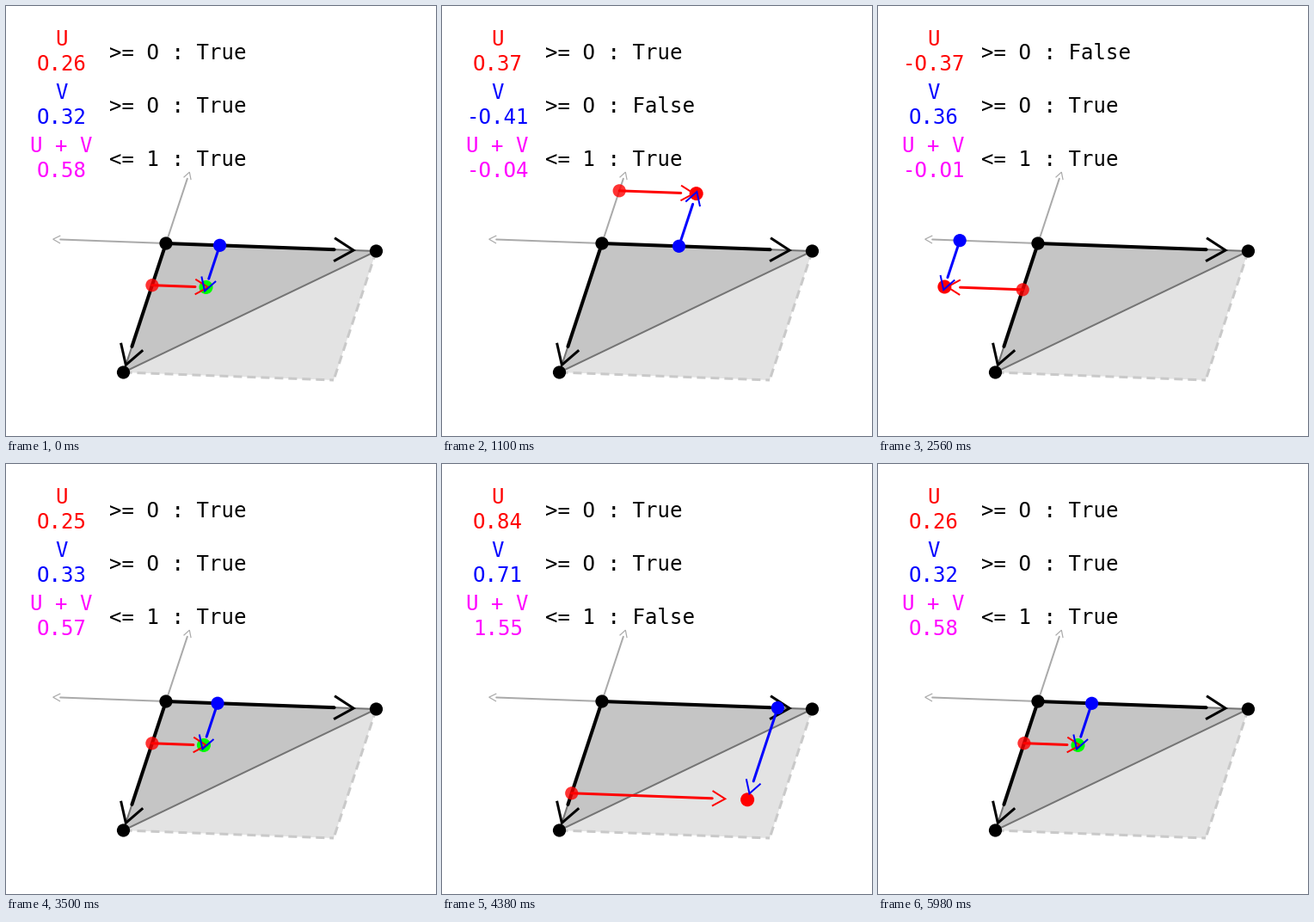
A matplotlib script for the animation above (6 s loop, 500 by 500 pixels).

```python
import numpy as np
import matplotlib.pyplot as plt
from matplotlib.animation import FuncAnimation
from matplotlib.patches import Circle, Polygon

SIZE, DPI, FRAMES, STEP = 500, 100, 300, 20
PX = 72 / DPI
LEG = 995  # ms for one way out or back

A = np.array([186.0, 276.0])
B = np.array([430.5, 285.0])
C = np.array([136.5, 426.0])
E1, E2 = B - A, C - A
D = A + E1 + E2

HOME = np.array([0.256, 0.3245])
PEAKS = np.array([[0.408, -0.687], [-0.3795, 0.3595], [0.860, 0.728]])

# Sharp start, then a long settling tail
KNOT_T = np.array([0, 40, 85, 105, 150, 200, 245, 300, 360, 400, 510, 600, 800, 1000])
KNOT_Q = np.array([0, .045, .193, .276, .54, .79, .88, .923, .948,
                   .96, .983, .989, .997, 1])
SLOPE = np.gradient(KNOT_Q, KNOT_T)
SLOPE[[0, -1]] = 0


def ease(ms):
    """Cubic Hermite through the knots."""
    if ms >= KNOT_T[-1]:
        return 1.0
    i = np.searchsorted(KNOT_T, ms, side="right") - 1
    h = KNOT_T[i + 1] - KNOT_T[i]
    s = (ms - KNOT_T[i]) / h
    return (KNOT_Q[i] * (1 + 2 * s) * (1 - s) ** 2
            + KNOT_Q[i + 1] * s * s * (3 - 2 * s)
            + h * SLOPE[i] * s * (1 - s) ** 2
            + h * SLOPE[i + 1] * s * s * (s - 1))


def uv_at(ms):
    leg = min(int(ms // LEG), 5)
    q = ease(ms - leg * LEG)
    if leg % 2:
        q = 1 - q
    return HOME + (PEAKS[leg // 2] - HOME) * q


fig = plt.figure(figsize=(SIZE / DPI, SIZE / DPI), dpi=DPI, facecolor="white")
ax = fig.add_axes([0, 0, 1, 1])
ax.set_xlim(0, SIZE)
ax.set_ylim(SIZE, 0)
ax.axis("off")


def line(pts, color, width, z, **kw):
    x, y = np.transpose(pts)
    kw.setdefault("solid_capstyle", "round")
    return ax.plot(x, y, color=color, lw=width * PX, zorder=z, **kw)[0]


def dot(center, color, z, radius=7.6, alpha=1):
    return ax.add_patch(Circle(center, radius, fc=color, ec="none", alpha=alpha, zorder=z))


class Arrow:
    """Shaft over 80% of the vector, then an open head of fixed size."""

    def __init__(self, color, width, head_width, length, half, z):
        self.length, self.half = length, half
        self.shaft = line([A, A], color, width, z)
        self.head = line([A, A], color, head_width, z, solid_joinstyle="miter",
                         solid_capstyle="butt")

    def set(self, start, vec):
        norm = max(np.hypot(*vec), 1e-6)
        d = vec / norm
        n = np.array([-d[1], d[0]]) * self.half
        end = start + 0.8 * vec
        self.shaft.set_data(*np.transpose([start, end]))
        self.head.set_data(*np.transpose([end + n, end + d * self.length, end - n]))
        return self


def label(x, y, s, color, ha="center"):
    return ax.text(x, y, plain(s), color=color, ha=ha, va="baseline",
                   family="DejaVu Sans Mono", size=24 * PX, zorder=20)


def plain(s):
    """Show zeros without the inner dot."""
    return s.replace("0", "O")


# Fixed scene
ax.add_patch(Polygon([B, D, C], fc="#e3e3e3", ec="none", zorder=1))
for end in (B, C):
    line([end, D], "#c9c9c9", 3, 2, ls=(0, (10 / 3, 6 / 3)), dash_capstyle="butt")
ax.add_patch(Polygon([A, B, C], fc="#c5c5c5", ec="#747474", lw=2 * PX, zorder=3))
Arrow("#aaaaaa", 2, 1.2, 8.5, 4.5, 4).set(A, -E1 * 0.628)
Arrow("#aaaaaa", 2, 1.2, 8, 4.5, 4).set(A, -E2 * 0.627)
Arrow("black", 4, 3, 22.5, 13.5, 5).set(A, E1)
Arrow("black", 4, 3, 22.5, 13.5, 5).set(A, E2)
for corner in (A, B, C):
    dot(corner, "black", 6)

# Moving parts
point = dot(A, "red", 7, radius=8)
u_foot = dot(A, "blue", 8)
v_foot = dot(A, "red", 8, alpha=0.8)
u_arrow = Arrow("red", 3, 2, 15, 8.8, 9)
v_arrow = Arrow("blue", 3, 2, 15, 8.8, 10)

ROWS = (("U", "red"), ("V", "blue"), ("U + V", "magenta"))
values, tests = [], []
for i, (name, color) in enumerate(ROWS):
    top = 62 * i
    label(64.7, 46.5 + top, name, color)
    values.append(label(65, 74.7 + top, "", color))
    tests.append(label(119.5, 62.3 + top, "", "black", ha="left"))


def draw(i):
    u, v = uv_at(i * STEP)
    on_u, on_v = A + u * E1, A + v * E2
    point.center = tuple(on_u + v * E2)
    u_foot.center = tuple(on_u)
    v_foot.center = tuple(on_v)
    u_arrow.set(on_v, u * E1)
    v_arrow.set(on_u, v * E2)

    checks = (u >= 0, v >= 0, u + v <= 1)
    point.set_facecolor("#00ff00" if all(checks) else "red")
    for text, value in zip(values, (u, v, u + v)):
        text.set_text(plain(f"{value:.2f}"))
    for text, rule, ok in zip(tests, (">= 0", ">= 0", "<= 1"), checks):
        text.set_text(plain(f"{rule} : {bool(ok)}"))
    return []


anim = FuncAnimation(fig, draw, frames=FRAMES, interval=STEP, repeat=True,
                     repeat_delay=0, blit=False)
plt.show()
```
